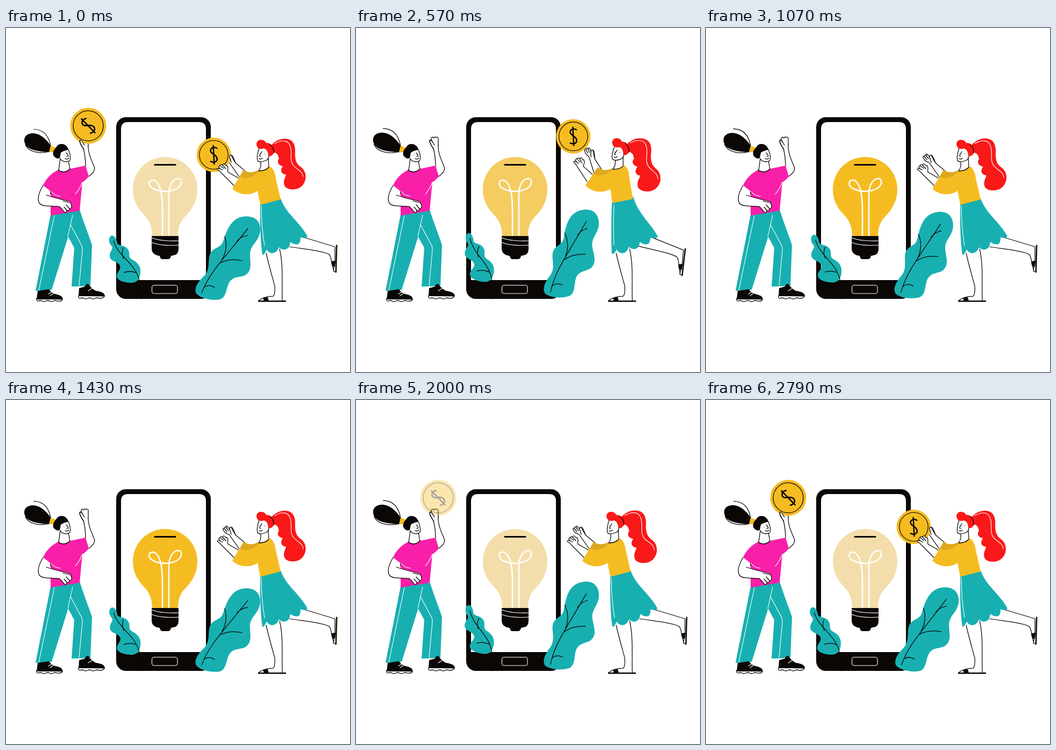
Animation of 640x640 px, one loop 2870 ms. Source, as an HTML page:

```html
<!DOCTYPE html>
<html lang="en">
<head>
<meta charset="utf-8">
<title>Funding an idea</title>
<style>
  html, body { margin: 0; height: 100%; overflow: hidden; background: #fff; }
  svg { display: block; width: 100vw; height: 100vh; }
  .ink { fill: #0b0705; }
  .teal { fill: #18afb1; }
  .pink { fill: #f91fa9; }
  .red { fill: #f91919; }
  .gold { fill: #f5bc22; }
  .shade { fill: #dda820; }
  .line, .skin, .white { stroke: #0b0705; stroke-width: 1.25; stroke-linecap: round; stroke-linejoin: round; }
  .line, .white { fill: none; }
  .skin { fill: #fff; }
  .white { stroke: #fff; stroke-width: 1.1; }
</style>
</head>
<body>
<svg viewBox="0 0 640 640">
  <defs>
    <g id="coin">
      <circle class="gold" r="33.5"/>
      <circle class="line" r="28"/>
      <path class="line" style="stroke-width:2.6" d="M6 -13C-3 -18 -10 -9 -4 -4C1 0 9 4 6 11C4 15 -2 15 -6 13M-1 -18L1 18"/>
    </g>
  </defs>

  <g id="phone">
    <rect class="ink" x="205" y="166" width="176" height="338" rx="18"/>
    <path fill="#fff" d="M214 469V188Q214 175 227 175H359Q372 175 372 188V469Z"/>
    <rect class="white" x="271.500" y="478.500" width="47.500" height="15.500" rx="4"/>
  </g>

  <g id="lamp">
    <path id="glass" d="M236 300A60 60 0 0 1 356 300C356 322 346 338 334 350C323 361 320 372 320 388H272C272 372 268 360 258 349C246 337 236 322 236 300Z"/>
    <path class="line" style="stroke-width:3.2" d="M277 254.500H315"/>
    <path class="white" style="stroke-width:2.600" d="M291 386C291 350 292 320 288 303C285 293 280 283 273 283C264 283 264 294 274 299C288 306 308 305 319 298C329 291 328 280 320 280C309 281 303 295 303 310V386"/>
    <path class="ink" d="M271 387H321V411Q321 422 311 423L307 424Q306 430 301 430H291Q287 430 286 424Q271 422 271 410Z"/>
    <path class="white" d="M271 390Q286 397 321 396M271 399Q288 406 321 404"/>
  </g>

  <g id="leafLeft">
    <path class="teal" d="M197 386C203 387 206 394 207 401C211 406 221 403 227 412C232 420 226 426 235 431C247 437 251 445 250 456C249 468 243 474 233 474C220 474 207 470 206 462C206 454 215 449 212 442C209 434 194 435 193 425C192 416 200 412 197 406C191 401 189 389 197 386Z"/>
    <path class="line" d="M200 396C209 426 240 436 248 470Q252 482 252 504M218 409Q214 420 219 429M219 455Q231 451 241 455"/>
  </g>

  <g id="dancer">
    <path class="teal" id="legFar"/>
    <path class="teal" id="legNear"/>
    <path class="white" id="seams"/>
    <path class="skin" d="M57 503Q56 508 60 508q4 -2 7 0t7 0t7 0t7 0t7 0q9 1 10 -3ZM135 498Q134 503 138 503q4 -2 7 0t7 0t7 0t7 0t7 0q9 0 10 -4Z"/>
    <path class="ink" d="M59 489L80 486Q84 493 92 495Q105 497 106 505H57ZM136 484L147 481Q148 476 153 476Q158 484 167 489Q184 491 184 499H135Z"/>
    <path class="white" d="M79 495L85 491M82 498L88 494M153 489L161 484"/>
    <path class="skin" id="throwArm"/>
    <g id="throwHand">
      <path class="skin" d="M144 225C140 218 135 211 138 208Q141 208 143 213Q138 206 141 203.500Q143 202 145 205Q146 201 149 204Q151 201 153 205V218"/>
    </g>
    <g id="torso">
      <g id="ponyLeft">
        <path class="ink" d="M84 220C72 202 60 196 50 196C36 196 32 206 35 214C38 224 52 230 82 231Z"/>
        <path class="line" d="M52 188.500C72 189 80 203 83 219M36 217C42 232 65 234 80 230"/>
      </g>
      <path class="gold" d="M83 219L94 223L91 231L80 231Z"/>
      <path class="skin" d="M101 243L98 265Q108 271 119 263L116 246"/>
      <path class="skin" d="M100 229L116 226C119 234 122 243 118 247C113 251 103 248 101 243"/>
      <path class="ink" d="M88 237C86 228 92 224 94 221C98 213 113 214 116 226C110 228 104 230 102 232L100 242Q94 245 88 237Z"/>
      <path class="line" d="M108 236h.1M115 234h.1M112 232L116 238L113 239.500M110 243Q114 245 117 242"/>
      <path class="pink" d="M97 264C104 270 112 269 119 262L148 256L154 276Q149 283 142 287L137 340L83 349V304L69 293C74 281 83 271 97 264Z"/>
      <path class="line" d="M97 264C104 270 112 269 119 262"/>
      <path class="white" d="M142 287Q137 300 129 309M84 304Q90 312 101 313"/>
      <path fill="#fff" d="M69 293L83 304L82 314L66 320Z"/>
      <path class="skin" d="M69 293C61 306 58 318 62 326C68 333 84 331 99 332Q104 336 109 343Q114 344 113 339Q118 341 118 336Q123 336 122 330L119 323C108 320 90 316 75 311"/>
      <path class="line" d="M113 339L108 333M118 336L112 329M106 322L118 325M83 304V309"/>
    </g>
  </g>
  <use href="#coin" id="coinLeft"/>
  <path class="skin" id="thumb" d="M145 226C140 218 135 211 138 208.500Q141 209 146 218"/>

  <g id="leafRight">
    <path class="teal" d="M446 350.500C464 350 474 360 473 377C471 398 455 402 454 420C454 438 459 451 445 460C434 465 423 461 415 474C409 486 410 501 398 505C384 508 362 503 354 494C349 484 358 471 369 461C383 446 372 425 384 414C392 407 400 408 404 397C412 371 422 351 446 350.500Z"/>
    <path class="line" d="M364 493C378 455 404 431 450 373M407 388Q414 410 402 431M439 433Q416 428 399 437M450 386Q438 387 430 396M388 483Q378 476 369 482"/>
  </g>

  <g id="runner">
    <path class="line" d="M484 419C490 445 496 465 500 480Q501 496 497 499Q480 499 470 507M509 411C516 440 513 470 514 507"/>
    <path class="ink" d="M469 507H521V509.500H469ZM478 502L487 501L489 508H480Z"/>
    <g id="kick">
      <path class="skin" d="M549 388L612 407V436L609 452L613 454M528 407C560 412 590 415 601 421Q605 425 606 438L610 452"/>
      <path class="ink" d="M605 434L613 433L612 444H608ZM614 403.500H616.500L615 455H612.500Z"/>
    </g>
    <path class="teal" id="skirt"/>
    <path class="white" id="skirtSeam"/>
    <g class="lean">
      <g id="ponyRight">
        <path class="red" d="M491 221C501 209 510 206 519 206C532 206 538 215 538 228C537 245 540 253 549 259C561 268 560 287 548 296C540 302 525 302 519 295C514 286 520 278 521 273C511 271 510 265 515 257C505 255 504 248 508 243C506 238 507 233 497 231Z"/>
        <path class="white" d="M500 215C512 208 524 208 528 218C534 232 526 245 535 256C542 264 552 266 553 277"/>
      </g>
      <path class="skin" d="M474 246V257Q473 262 470 266Q483 266 489 260L488 242"/>
      <path class="skin" d="M471 223C468 232 466 240 468 247Q472 251 482 247Q488 246 489 238Q490 230 482 222Z"/>
      <path class="red" d="M470 224C463 218 466 208 474 208C480 208 483 211 484 214C492 212 500 222 499 231C497 237 492 239 488 239C488 232 486 226 480 224Q475 226 470 224Z"/>
      <path class="line" d="M491 217Q499 222 498 232M472 234h.1M481 234h.1M476 230L471.500 238L474 239M471 243Q474 245 477 242"/>
      <g class="reachFar">
        <path class="skin" d="M446 267L427 251Q423 240 420.500 237Q417 235 418 243L412 235Q409 233 410 238Q406 234 406 239Q402 238 405 243Q407 248 415 250L434 277"/>
        <path class="line" d="M410 238L414 243M406 239L411 245"/>
      </g>
    </g>
    <use href="#coin" id="coinRight"/>
    <g class="lean">
      <g class="reachFar">
        <path class="skin" d="M419 250L416 240Q416 235 419 237Q423 245 427 251"/>
      </g>
      <g class="reachNear">
        <path class="skin" d="M425 294L403 272Q398 266 393 263Q394 260 398 262Q394 257 398 256Q399 253 403 255Q405 250 409 256Q412 254 413 261Q412 266 413 268L432 279"/>
        <path class="line" d="M398 262L403 264M398 256L405 261M403 255L409 262"/>
      </g>
      <path class="gold" d="M470 266Q483 266 490 257Q500 262 502 280L511 319L473 329L468 303C455 312 435 312 421 299L436 274L442 264Q455 272 470 266Z"/>
      <path class="shade" d="M435 277L442 264Q453 273 470 264L467 270Q452 283 435 277Z"/>
      <path class="line" d="M470 266Q483 266 489 259"/>
    </g>
  </g>
</svg>
<script>
const LOOP = 2870, STEP = 71.5;
const el = id => document.getElementById(id);

// Eased value at time t from a flat list: time, value, time, value...
function key(t, ...k) {
  if (t <= k[0]) return k[1];
  for (let i = 2; i < k.length; i += 2) {
    if (t < k[i]) {
      const u = (t - k[i - 2]) / (k[i] - k[i - 2]);
      return k[i - 1] + (k[i + 1] - k[i - 1]) * u * u * (3 - 2 * u);
    }
  }
  return k[k.length - 1];
}

// Blend every number of two paths with the same structure.
function blend(a, b, p) {
  const target = b.match(/-?\d+/g);
  let i = 0;
  return a.replace(/-?\d+/g, n => +n + (target[i++] - n) * p);
}

const shapes = {
  legFar: ["M115 343L137 338C146 366 154 385 160 404L157 480L122 481L127 409L115 387Z",
           "M102 343L124 339C136 364 143 385 152 402L155 479L120 481L120 410L103 386Z"],
  legNear: ["M83 347L137 338L116 387L85 487L55 489Z",
            "M71 351L124 339L104 386L85 486L53 489Z"],
  seams: ["M90 349L61 488M124 348L115 388M120 366L141 405Q143 409 141 425L136 479",
          "M77 350L60 488M111 344L104 384M108 364L133 403Q135 406 134 425L133 479"],
  throwArm: ["M148 257C148 248 147 236 144 224L153 217C152 232 159 246 164 258C167 265 161 271 154 276",
             "M130 258C143 253 147 240 155 227L168 220C163 236 159 250 154 264C151 272 146 275 134 280"],
  skirt: ["M473 327L511 317C520 345 548 362 561 388Q555 393 548 389Q548 400 544 402Q537 404 529 398Q528 410 520 412Q512 413 508 408Q503 420 494 419Q487 417 485 412Q481 422 477 422Q472 390 473 327Z",
          "M476 324L516 314C524 345 550 365 562 389Q555 393 548 390Q547 400 543 402Q536 404 528 398Q527 409 520 411Q512 412 508 407Q503 420 494 419Q487 417 485 412Q480 422 476 420Q474 390 476 324Z"],
  skirtSeam: ["M475 331Q475 370 481 405", "M480 329Q478 370 480 404"]
};
const shape = (id, p) => el(id).setAttribute("d", blend(...shapes[id], p));
const move = (node, value) => node.setAttribute("transform", value);
const moveAll = (name, value) => document.querySelectorAll("." + name).forEach(n => move(n, value));
const grow = (id, s, x, y) => move(el(id), `translate(${x} ${y}) scale(${s}) translate(${-x} ${-y})`);
function placeCoin(id, x, y, angle, size, opacity) {
  move(el(id), `translate(${x} ${y}) rotate(${angle}) scale(${size})`);
  el(id).setAttribute("opacity", opacity);
}

function draw(t) {
  const sway = 1.2 * (1 - Math.abs(1 - 4 * t / LOOP % 2));
  const toss = key(t, 0, 0, 180, 1.4, 500, 0);
  const lift = key(t, 360, 0, 570, 1, 640, 1, 900, 0);
  const glow = key(t, 430, 0, 700, 1, 1500, 1, 1930, 0);

  const [r, g, b] = [[243, 245], [222, 188], [171, 34]].map(([off, on]) => off + (on - off) * glow);
  el("glass").setAttribute("fill", `rgb(${r},${g},${b})`);

  move(el("leafLeft"), `rotate(${key(t, 0, 0, 350, 6.2, 1430, .2, 2400, 8.4, LOOP, 0)} 253 520)`);
  move(el("leafRight"), `rotate(${-9.2 * sway} 355 507)`);
  grow("ponyLeft", 1 + .045 * sway, 88, 225);
  grow("ponyRight", 1 + .04 * sway, 497, 222);

  for (const id of ["legFar", "legNear", "seams", "throwArm"]) shape(id, toss);
  move(el("torso"), `translate(${-13 * toss} ${2 * toss}) rotate(${-4.8 * toss} 110 345)`);
  const hand = `translate(${12 * toss} ${2 * toss}) rotate(${22 * toss} 148 222)`;
  move(el("throwHand"), hand);
  move(el("thumb"), hand);

  for (const id of ["skirt", "skirtSeam"]) shape(id, lift);
  move(el("kick"), `translate(${-1.5 * lift} ${-lift}) rotate(${5 * lift} 530 395)`);
  moveAll("lean", `translate(${4 * lift} ${-2 * lift}) rotate(${3.5 * lift} 492 324)`);
  moveAll("reachFar", `rotate(${14 * lift} 440 285)`);
  moveAll("reachNear", `rotate(${8 * lift} 440 285)`);

  placeCoin("coinLeft",
    key(t, 0, 153, 374, 296, 1000, 296, 1100, 153),
    key(t, 0, 182, 120, 174.5, 485, 218, 1000, 218, 1100, 182),
    -41, 1, key(t, 300, 1, 470, 0, 1900, 0, 2150, 1));
  placeCoin("coinRight",
    key(t, 360, 386.5, 600, 405, 900, 296, 1200, 296, 1300, 386.5),
    key(t, 360, 236, 670, 191, 1000, 230, 1200, 230, 1300, 236),
    0, .955, key(t, 790, 1, 960, 0, 2200, 0, 2470, 1));
}

function tick() {
  const step = Math.min(39, Math.floor((performance.now() % LOOP + 4) / STEP));
  draw(step * STEP);
  requestAnimationFrame(tick);
}
tick();
</script>
</body>
</html>
```
